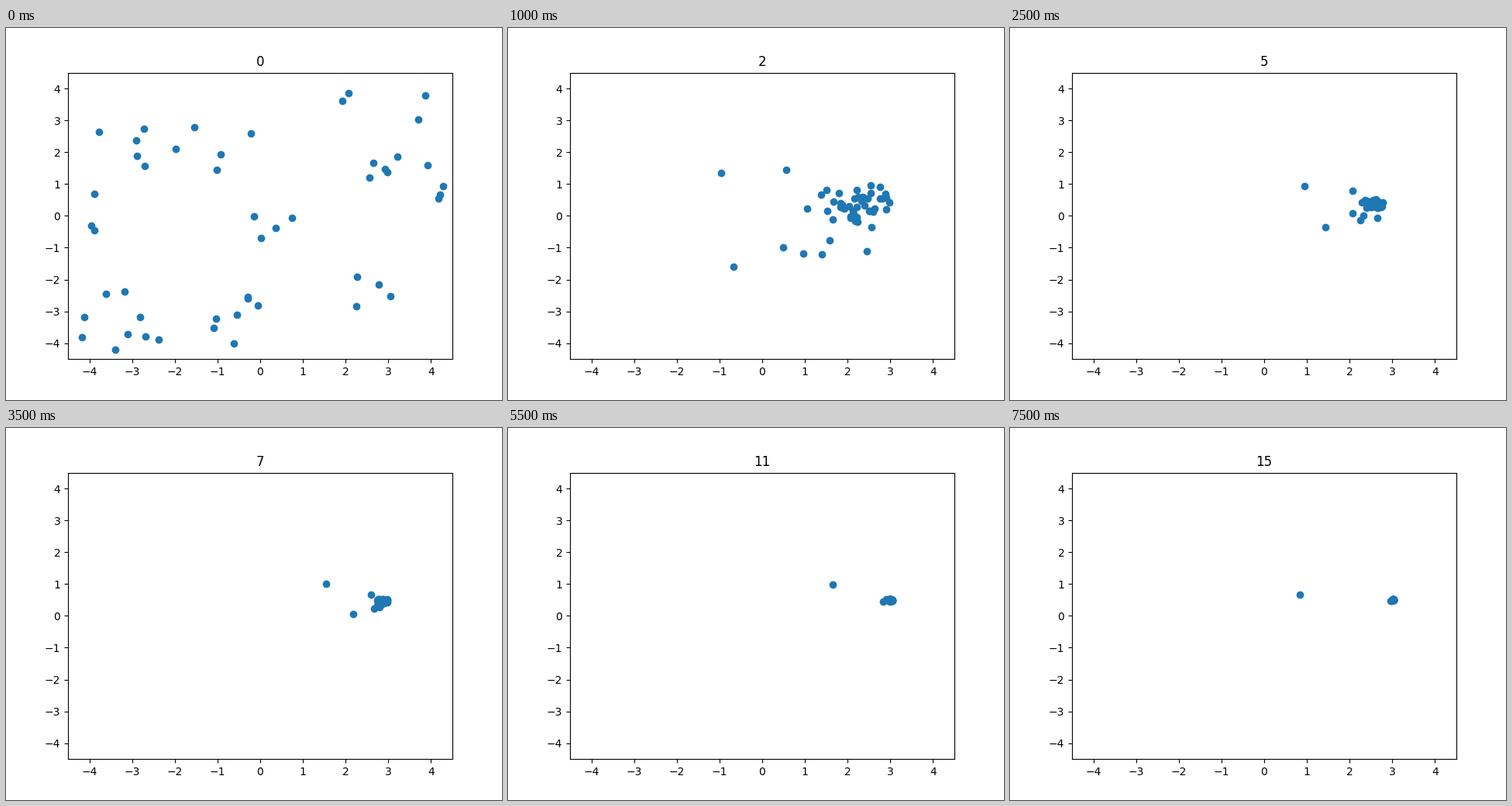
A matplotlib script that plays this animation: 640 px wide and 480 px high, repeating every 8 s.

```python
import numpy as np
import matplotlib.pyplot as plt
from matplotlib.animation import FuncAnimation

LIM = 4.5
STEPS = 16
rng = np.random.default_rng(7)

# Patches the swarm starts in: centre x, y, half width, half height, count.
PATCHES = [
    (-2.0, 2.0, 1.8, 1.0, 9),
    (-3.9, 0.1, 0.1, 0.6, 3),
    (-3.1, -3.2, 1.1, 1.0, 9),
    (-0.3, -3.3, 0.9, 1.0, 7),
    (-0.4, -0.2, 1.2, 0.7, 4),
    (2.8, 2.5, 1.2, 1.6, 10),
    (4.2, 0.8, 0.1, 0.5, 3),
    (3.1, -2.6, 0.9, 0.9, 4),
]
start = np.vstack([
    np.array([x, y]) + rng.uniform(-1, 1, (n, 2)) * (w, h)
    for x, y, w, h, n in PATCHES
])
rate = rng.uniform(0.35, 1.5, (len(start), 1))

# One particle stays apart and wanders along the valley.
LONER_T = [0, 1, 3, 5, 7, 9, 10, 11, 15]
LONER_X = [-2.9, -1.85, -0.07, 0.94, 1.54, 1.35, -0.4, 1.66, 0.84]
LONER_Y = [2.37, 2.08, 0.64, 0.94, 1.0, 0.95, 0.83, 0.98, 0.66]


def best(step):
    """The swarm's best point moves on to the minimum after step 5."""
    return np.array([np.interp(step, [5, 8], [2.58, 3.01]),
                     np.interp(step, [5, 8], [0.37, 0.5])])


def positions(step):
    goal = best(step)
    left = np.exp(-rate * step)
    jitter = np.random.default_rng(step).uniform(-1, 1, start.shape)
    reach = 0.6 * np.exp(-0.23 * step) * np.array([1, 0.6])
    swarm = goal + (start - goal) * left + jitter * reach * (1 - left)
    loner = [np.interp(step, LONER_T, LONER_X),
             np.interp(step, LONER_T, LONER_Y)]
    return np.vstack([swarm, loner])


fig, ax = plt.subplots(figsize=(6.4, 4.8), dpi=100)
ax.set_xlim(-LIM, LIM)
ax.set_ylim(-LIM, LIM)
dots = ax.scatter(*positions(0).T, color="C0")
title = ax.set_title("0")


def update(step):
    dots.set_offsets(positions(step))
    title.set_text(str(step))
    return dots, title


anim = FuncAnimation(fig, update, frames=STEPS, interval=500,
                     repeat=True, repeat_delay=0)
plt.show()
```
